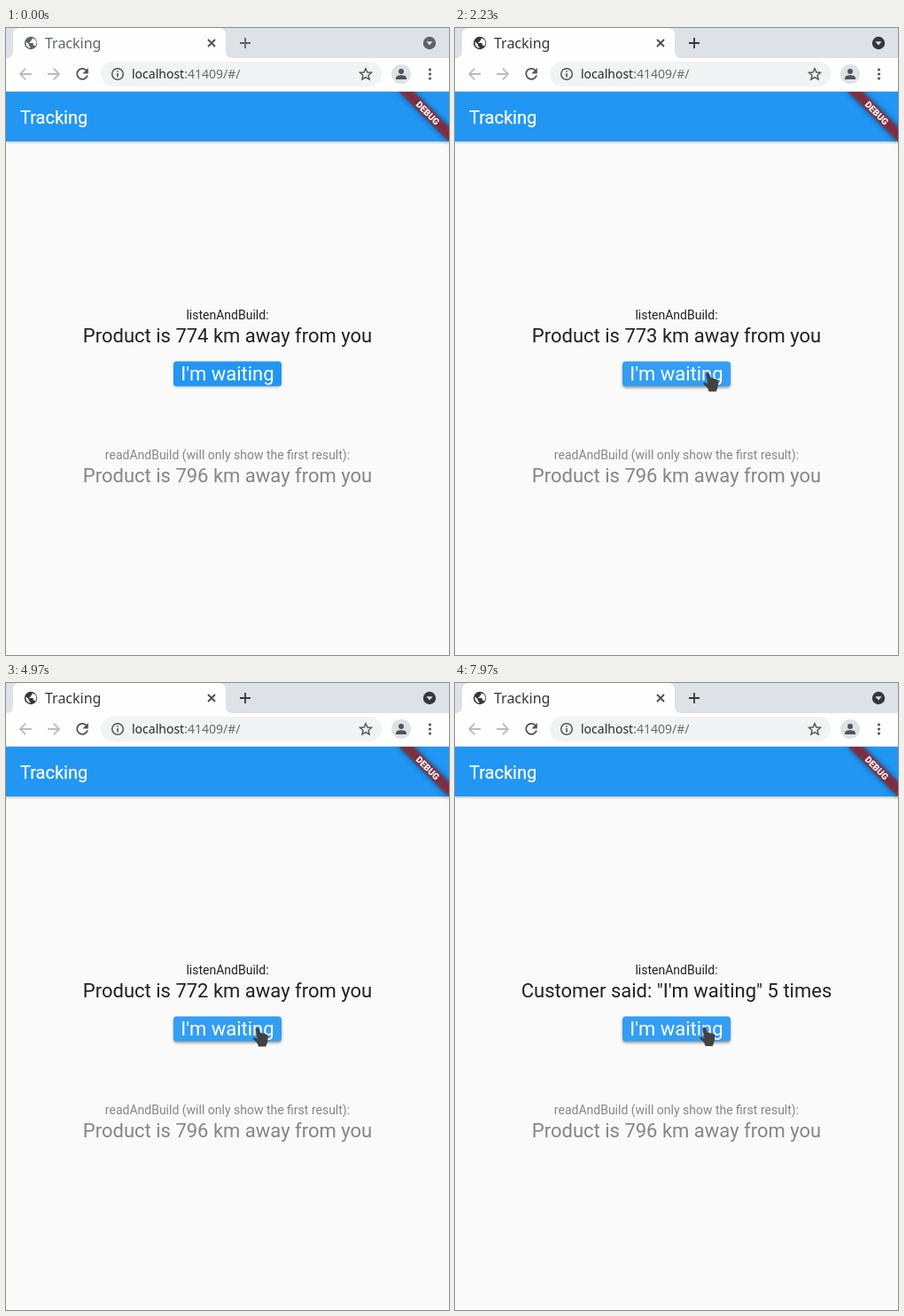
An HTML page that plays this animation: 500x708 px, repeating every 8 s.

```html
<!DOCTYPE html>
<html lang="en">
<head>
<meta charset="utf-8">
<title>Tracking</title>
<style>
  html, body { margin: 0; width: 100%; height: 100%; overflow: hidden; background: #fafafa; }
  svg { display: block; width: 500px; height: 708px; }
  text { font-family: Roboto, sans-serif; }
  .chrome { font-family: "Noto Sans", sans-serif; }
  .mid { text-anchor: middle; }
  .big { font-size: 22px; }
  .small { font-size: 14px; }
  .line { fill: none; stroke-width: 1.8; }
</style>
</head>
<body>
<svg viewBox="0 0 500 708">
  <defs>
    <clipPath id="page"><rect y="72" width="500" height="636"/></clipPath>
    <clipPath id="buttonShape"><rect x="189" y="376.5" width="122" height="28" rx="3.5"/></clipPath>
    <filter id="blur" x="-20%" y="-60%" width="140%" height="240%"><feGaussianBlur stdDeviation="1.6"/></filter>
    <filter id="bannerBlur" x="-20%" y="-100%" width="140%" height="300%"><feGaussianBlur stdDeviation="3"/></filter>
  </defs>

  <!-- Browser: tab strip -->
  <rect width="500" height="34" fill="#dee1e6"/>
  <path d="M0 34Q8 34 8 26V8Q8 0 16 0H240Q248 0 248 8V26Q248 34 256 34Z" fill="#fefefe"/>
  <g id="tabBar">
    <circle cx="28" cy="17" r="7.2" fill="currentColor"/>
    <path d="M22.6 15.5l3.2 3v1.4l1.6 1.6v1.2q-4.6-1-5-5.8ZM29.4 11.4v1.6q0 1.2-1.5 1.2v1.5h-1.5v1.4h4.3v2.4h1.4l1 1.2q2.6-3.8-.1-7.6-1.2-1.2-3.6-1.7Z" fill="#fefefe"/>
    <text class="chrome" x="44" y="23" font-size="16" fill="currentColor">Tracking</text>
    <path class="line" d="M264 17H276M270 11V23" stroke="currentColor"/>
    <circle cx="478" cy="17" r="7.2" fill="currentColor"/>
    <path d="M474.4 15.2H481.6L478 19.4Z" fill="#dee1e6"/>
  </g>
  <path class="line" d="M228 13L236 21M236 13L228 21" stroke="#4a4c50" stroke-width="1.6"/>

  <!-- Browser: toolbar -->
  <rect y="34" width="500" height="38" fill="#fefefe"/>
  <rect y="71" width="500" height="1" fill="#dadce0"/>
  <rect x="107" y="38" width="317" height="28" rx="14" fill="#f1f3f4"/>
  <g class="line" stroke="#babcbe">
    <path d="M29 52H16M22.3 45.7L16 52L22.3 58.3"/>
    <path d="M47 52H60M53.7 45.7L60 52L53.7 58.3"/>
  </g>
  <g class="line" stroke="#505357">
    <path d="M91 48.2A6 6 0 1 0 92 53.4"/>
    <circle cx="126" cy="52" r="6.3" stroke-width="1.5"/>
    <path d="M126 51V55.6M126 48.2V49.8" stroke-width="1.6"/>
    <path d="M406 45.7L407.9 50L412.5 50.4L409 53.5L410.1 58.1L406 55.6L401.9 58.1L403 53.5L399.5 50.4L404.1 50Z" stroke-width="1.4"/>
  </g>
  <path d="M92.8 45V51.4H86.4Z" fill="#505357"/>
  <text class="chrome" x="142" y="57" font-size="14" fill="#28292c">localhost<tspan fill="#6a6d71">:41409/#/</tspan></text>
  <circle cx="446" cy="52" r="11" fill="#dee1e6"/>
  <g fill="#505357">
    <circle cx="446" cy="49" r="3"/>
    <path d="M440 58V56.2Q440.6 53.4 446 53.3Q451.4 53.4 452 56.2V58Z"/>
    <circle cx="478.5" cy="47" r="1.6"/><circle cx="478.5" cy="52" r="1.6"/><circle cx="478.5" cy="57" r="1.6"/>
  </g>

  <!-- App -->
  <g clip-path="url(#page)">
    <rect y="74" width="500" height="55" fill="#000" opacity=".3" filter="url(#blur)"/>
    <rect y="72" width="500" height="56" fill="#2196f3"/>
    <text x="16" y="107.5" font-size="20" fill="#fff" stroke="#fff" stroke-width=".25">Tracking</text>
    <g transform="translate(500 72) rotate(45)">
      <rect x="-40" y="28" width="80" height="12" fill="#000" opacity=".5" filter="url(#bannerBlur)"/>
      <rect x="-40" y="28" width="80" height="12" fill="#b71c1c" opacity=".63"/>
      <text class="mid" y="37.6" font-size="10.2" font-weight="900" fill="#fff">DEBUG</text>
    </g>
  </g>
  <g class="mid">
    <g fill="#212121">
      <text class="small" x="250" y="329">listenAndBuild:</text>
      <text class="big" id="message" x="250" y="355"></text>
    </g>
    <g fill="#868686">
      <text class="small" x="250" y="487">readAndBuild (will only show the first result):</text>
      <text class="big" x="250" y="513">Product is 796 km away from you</text>
    </g>
    <rect id="shadow" x="189" width="122" height="28" rx="4" filter="url(#blur)"/>
    <rect id="button" x="189" y="376.5" width="122" height="28" rx="3.5"/>
    <g clip-path="url(#buttonShape)"><circle id="ripple" cx="284" cy="391" fill="#fff"/></g>
    <text class="big" x="250" y="397.5" fill="#fff">I'm waiting</text>
  </g>

  <g fill="#424242">
    <path id="arrow" d="M0 0V17.5L3.6 15.2L6 20.5L9 19L6.8 14L10.8 11.8Z"/>
    <path id="hand" d="M4 .8Q5.5-.6 6.8 1L8.8 6L15 7.6Q17.6 8.4 17.3 11L16.6 16.5L14.8 21.5H6.6L5.2 17.8L.8 13.5Q-.3 11.8 1.3 11L5.2 12.4L3.4 2.5Q3.2 1.4 4 .8Z"/>
  </g>
</svg>
<script>
const LOOP = 8000, HOVER = 1800, FOCUS = 1950;
const CLICKS = [2760, 7000];
const RIPPLE = 450, REPLY_DELAY = 60;
const FIRST_TICK = 1850, TICK = 2280;

const ARROW_START = 1130;
// Pointer keys: time, x, y
const ARROW_PATH = [[ARROW_START, 500, 462], [1470, 348, 408], [1670, 320, 401], [HOVER, 288, 394]];
const HAND_PATH = [[HOVER, 282, 390], [1950, 280, 389], [4250, 280, 389],
  [4700, 278.5, 389], [5900, 278.5, 389], [6250, 277, 388.5], [6800, 277, 388.5], [7100, 276, 388.5]];

const el = id => document.getElementById(id);
const set = (id, attrs) => {
  for (const name in attrs) el(id).setAttribute(name, attrs[name]);
};

// The distance drops at a steady rate; the newest event, tick or click, is the one shown.
function message(t) {
  const ticks = Math.max(0, Math.floor((t - FIRST_TICK) / TICK) + 1);
  const lastTick = ticks ? FIRST_TICK + (ticks - 1) * TICK : 0;
  const click = CLICKS.findLastIndex(start => start + REPLY_DELAY <= t);
  return click >= 0 && CLICKS[click] > lastTick
    ? `Customer said: "I'm waiting" ${click + 4} times`
    : `Product is ${774 - ticks} km away from you`;
}

function position(path, t) {
  const next = path.findIndex(key => key[0] > t);
  if (next < 0) return path.at(-1).slice(1);
  if (next === 0) return path[0].slice(1);
  const [t0, x0, y0] = path[next - 1], [t1, x1, y1] = path[next];
  const k = (t - t0) / (t1 - t0);
  return [x0 + (x1 - x0) * k, y0 + (y1 - y0) * k];
}

function place(id, path, t, visible) {
  set(id, {
    transform: `translate(${position(path, t)})`,
    visibility: visible ? "visible" : "hidden"
  });
}

function draw(t) {
  const hover = t >= HOVER;
  el("message").textContent = message(t);
  set("tabBar", { color: t < FOCUS ? "#5f6368" : "#35373b" });
  set("button", { fill: hover ? "#339ef4" : "#2196f3" });
  set("shadow", { opacity: hover ? .38 : .25, y: hover ? 378.5 : 377.5 });

  const click = CLICKS.find(start => t >= start && t < start + RIPPLE);
  const age = click === undefined ? 1 : (t - click) / RIPPLE;
  set("ripple", { r: 110 * Math.sqrt(age), opacity: .2 * (1 - age) });

  place("arrow", ARROW_PATH, t, t >= ARROW_START && !hover);
  place("hand", HAND_PATH, t, hover);
}

function frame() {
  draw(performance.now() % LOOP);
  requestAnimationFrame(frame);
}
frame();
</script>
</body>
</html>
```
